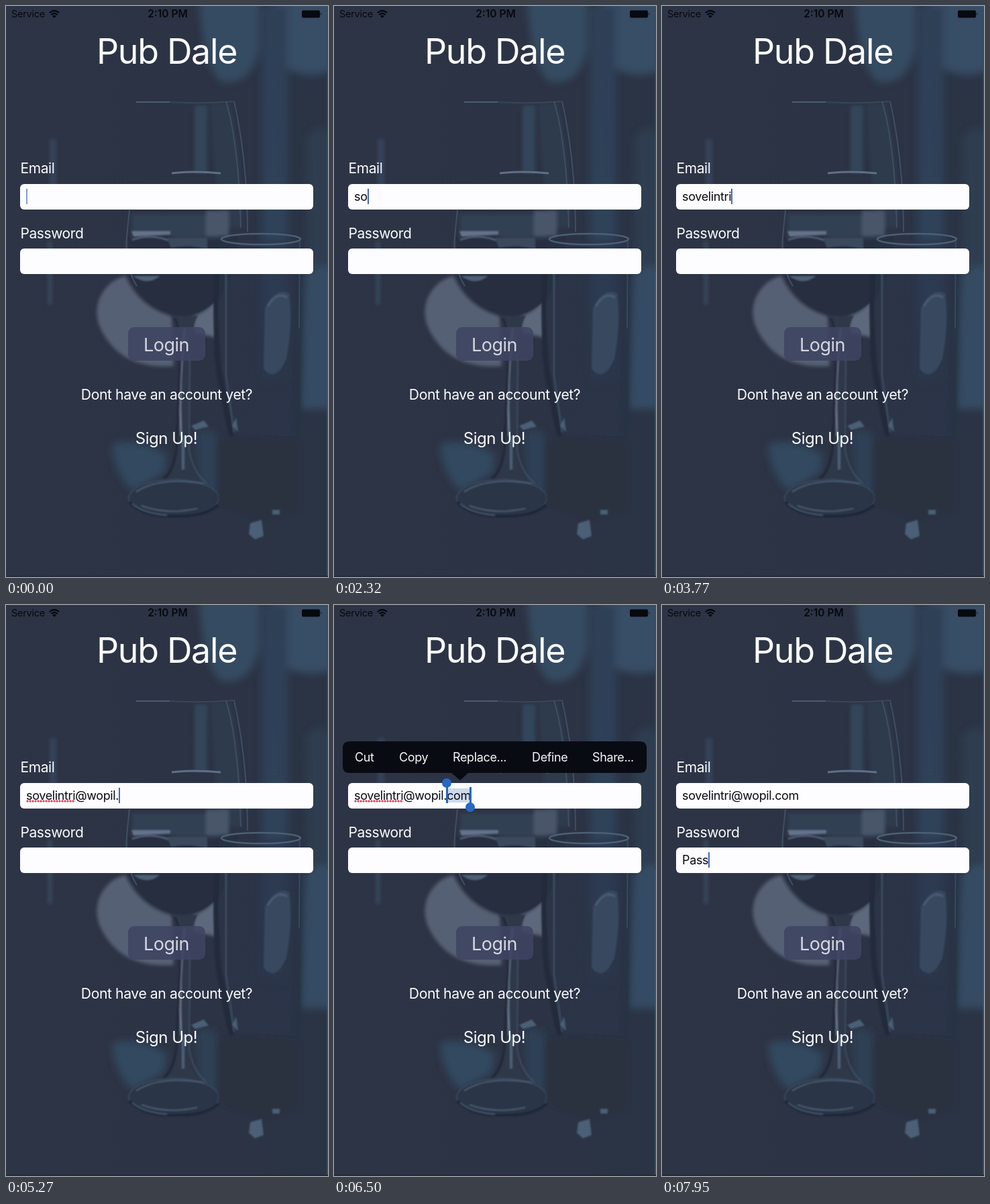
An HTML page that plays this animation: 480x850 px, repeating every 8 s.

```html
<!DOCTYPE html>
<html lang="en">
<head>
<meta charset="utf-8">
<title>Login screen</title>
<style>
html, body { margin: 0; width: 100%; height: 100%; overflow: hidden; background: #2c3345; }
#stage { position: relative; width: 480px; height: 850px; overflow: hidden;
  font-family: Inter, "Open Sans", sans-serif; }
text, .field { letter-spacing: -.02em; }
svg { position: absolute; left: 0; top: 0; }
.mid { text-anchor: middle; }
.title { font-size: 52px; letter-spacing: -.026em; }
.clock { font-size: 15.5px; font-weight: 600; letter-spacing: 0; }
.field { position: absolute; left: 21px; width: 437px; height: 38px; box-sizing: border-box;
  padding-left: 9px; border-radius: 6px; background: #fdfdff; color: #090b12;
  font-size: 18px; line-height: 38px; white-space: pre; }
.caret { position: absolute; top: 7px; width: 2px; height: 23px; background: #4167c5; }
.misspelt { background: radial-gradient(circle, #e0344c 1.3px, transparent 1.8px) 0 100% / 4px 4px repeat-x; }
#tld { position: relative; }
#tld.selected { background: #ccd9eb; }
.handle { display: none; position: absolute; top: -2px; width: 2.5px; height: 24px; background: #2867bd; }
.selected .handle { display: block; }
.handle::after { content: ""; position: absolute; left: -6px; width: 14px; height: 14px;
  border-radius: 50%; background: #2867c4; }
.start { left: -1px; }
.start::after { top: -13px; }
.end { right: -1px; }
.end::after { top: 23px; }
</style>
</head>
<body>
<div id="stage">
  <svg width="480" height="850" viewBox="0 0 480 850">
    <defs>
      <filter id="soft" x="-50%" y="-20%" width="200%" height="140%"><feGaussianBlur stdDeviation="6"/></filter>
      <filter id="haze" x="-100%" y="-20%" width="300%" height="140%"><feGaussianBlur stdDeviation="2.5"/></filter>
      <filter id="fine" x="-30%" y="-30%" width="160%" height="160%"><feGaussianBlur stdDeviation=".8"/></filter>
      <linearGradient id="wall">
        <stop offset="0" stop-color="#2d3445"/><stop offset=".6" stop-color="#2c3344"/>
        <stop offset="1" stop-color="#2a3445"/>
      </linearGradient>
      <linearGradient id="band" x2="0" y2="1">
        <stop offset="0" stop-color="#2f4157"/><stop offset=".7" stop-color="#2d4259"/>
        <stop offset="1" stop-color="#2b3649"/>
      </linearGradient>
    </defs>
    <rect width="480" height="850" fill="url(#wall)"/>

    <g filter="url(#soft)">
      <path d="M288 -20H378V60Q368 116 325 114Q292 100 288 -20Z" fill="#364b62"/>
      <path d="M396 -20H490V95Q445 112 408 86Z" fill="#384e66"/>
      <rect x="382" y="0" width="38" height="560" fill="url(#band)"/>
      <path d="M448 195Q470 170 490 195V400H450Z" fill="#2d3d50"/>
      <path d="M446 400Q470 380 490 390V600H440Z" fill="#354c63"/>
      <path d="M158 652Q195 642 240 668L236 695L190 722Q162 700 158 652Z" fill="#324a60"/>
      <path d="M282 632Q310 625 316 645V735H288Z" fill="#2f4155"/>
    </g>
    <g filter="url(#haze)">
      <rect x="65" y="198" width="10" height="84" fill="#35425a"/>
      <rect x="62" y="350" width="7" height="95" fill="#364459"/>
      <rect x="281" y="148" width="19" height="100" fill="#32445a"/>
      <path d="M304 145H334Q352 220 352 330H318Z" fill="#2d3a4e"/>
      <path d="M178 402Q198 448 247 462L250 536Q190 540 160 508Q125 470 140 434Q152 408 178 402Z" fill="#566175"/>
      <path d="M278 462Q306 452 315 430V494L280 486Z" fill="#5d687b"/>
      <path d="M188 310H318V345H188Z" fill="#313f52"/>
      <path d="M298 305H332V342H298Z" fill="#49566b"/>
      <path d="M438 365V640H424L429 430Z" fill="#283043"/>
    </g>

    <g filter="url(#fine)">
      <path d="M182 347Q225 336 262 347T345 343Q344 405 315 437Q290 461 258 461Q204 451 182 398Z" fill="#272e3f"/>
      <path d="M187 335H245V340L190 343Z" fill="#65728a"/>
      <path d="M188 348Q215 339 240 348T300 349" fill="none" stroke="#596880" stroke-width="2"/>
      <path d="M190 402H229Q211 417 190 402ZM215 365L236 379L210 386Z" fill="#505e75"/>
      <path d="M240 345H300V362Q270 354 246 360Z" fill="#3a485d"/>
      <path d="M317 348H440L434 640H330L317 520Z" fill="#2b384a" opacity=".45"/>
      <path d="M247 461H286Q274 482 274 520L271 650Q272 694 298 714H231Q251 697 254 660L259 520Q259 482 247 461Z" fill="#2e384a"/>
      <path d="M266 480Q257 560 261 640" fill="none" stroke="#66758a" stroke-width="3"/>
      <path d="M264 640V690" fill="none" stroke="#4e5f75" stroke-width="4"/>
      <path d="M252 465Q261 483 260 530L254 660Q251 694 230 709" fill="none" stroke="#212838" stroke-width="3"/>
      <path d="M274 520L273 660Q278 694 300 711" fill="none" stroke="#3f4f64" stroke-width="2"/>
      <ellipse cx="250" cy="733" rx="67" ry="28" fill="#2b3547" stroke="#394a5e" stroke-width="2"/>
      <path d="M184 738Q205 764 270 759Q303 756 316 742" fill="none" stroke="#1f2838" stroke-width="4"/>
      <path d="M194 723Q230 700 295 711M202 744Q240 758 285 748M188 741Q206 756 240 758" fill="none" stroke="#53657b" stroke-width="1.5"/>
      <path d="M316 360Q310 460 317 540L336 640" fill="none" stroke="#232b3b" stroke-width="8"/>
      <path d="M328 365V550L340 635" fill="none" stroke="#405268" stroke-width="2"/>
      <path d="M386 450Q402 418 422 428Q428 470 418 525Q402 562 384 540Z" fill="#37495f"/>
      <path d="M390 447Q404 424 419 434" fill="none" stroke="#4a5d73" stroke-width="3"/>
    </g>
    <path d="M317 650Q350 636 438 650V750L380 766L317 742Z" fill="#293041" filter="url(#haze)"/>
    <g filter="url(#fine)" fill="#4b6076">
      <path d="M364 770L381 765L384 789L371 794L362 786ZM397 750h11v7h-11Z"/>
      <path d="M337 625l6-12 3 21zM276 625l19-8 7 9-20 5z"/>
    </g>
    <g fill="none">
      <path d="M194 143H244" stroke="#4d5c71" stroke-width="2"/>
      <path d="M244 143Q290 146 340 142" stroke="#384659" stroke-width="2"/>
      <path d="M328 142Q347 205 350 330M340 142Q360 230 360 336" stroke="#3f4e63" stroke-width="2"/>
      <path d="M247 249Q280 245 320 249" stroke="#5f7086" stroke-width="3"/>
      <path d="M184 304L180 344Q177 388 195 417" stroke="#414f63" stroke-width="2"/>
      <ellipse cx="380" cy="347" rx="59" ry="8" stroke="#4c5f75" stroke-width="2.5"/>
      <path d="M438 350L437 480" stroke="#364a5f" stroke-width="2"/>
    </g>
    <path d="M479.2 0V400" stroke="#315067" stroke-width="1.5"/>
    <path d="M479.2 395V850" stroke="#286173" stroke-width="1.5"/>
    <path d="M0 849H480" stroke="#252b3b" stroke-width="2"/>

    <g fill="#07090f">
      <text x="8" y="17" font-size="14.5">Service</text>
      <text class="mid clock" x="241" y="17">2:10 PM</text>
      <rect x="441" y="6.5" width="27" height="11" rx="2"/>
      <path d="M469.5 10q2 2 0 4Z"/>
      <path d="M72 18l-2.8-3.1q2.8-2.2 5.6 0Z"/>
      <path d="M64.8 10.2q7.2-6.4 14.4 0M67.4 13.2q4.6-4 9.2 0" fill="none" stroke="#07090f" stroke-width="2.2"/>
    </g>

    <rect x="182" y="478" width="115" height="50" rx="9" fill="#3f4562" opacity=".88"/>
    <g fill="#fbfcff">
      <text class="mid title" x="239.5" y="86">Pub Dale</text>
      <text x="21.5" y="249" font-size="21">Email</text>
      <text x="21.5" y="345.5" font-size="21">Password</text>
      <text class="mid" x="239" y="514" font-size="27" fill="#d6d8e1">Login</text>
      <text class="mid" x="239.5" y="586" font-size="21.2">Dont have an account yet?</text>
      <text class="mid" x="239" y="652" font-size="24">Sign Up!</text>
    </g>
  </svg>

  <div class="field" style="top:265px"><span id="user"></span><span id="host"></span><span id="tld"><span id="ending"></span><i class="handle start"></i><i class="handle end"></i></span><i class="caret" id="emailCaret"></i></div>
  <div class="field" style="top:361px"><span id="password"></span><i class="caret" id="passwordCaret"></i></div>

  <svg id="menu" width="480" height="270" viewBox="0 0 480 270" font-size="18" fill="#f7f8fb">
    <path d="M23 203H456Q466 203 466 213V240Q466 250 456 250H200L188 261L175 250H23Q13 250 13 240V213Q13 203 23 203Z" fill="#090b13"/>
    <text x="31" y="232.5">Cut</text>
    <text x="97" y="232.5">Copy</text>
    <text x="177" y="232.5">Replace...</text>
    <text x="295" y="232.5">Define</text>
    <text x="385" y="232.5">Share...</text>
  </svg>
</div>
<script>
const LOOP = 8000, SELECT_AT = 6100, PASSWORD_AT = 7000;
const $ = id => document.getElementById(id);
const clamp = x => Math.max(0, Math.min(1, x));

// Each run starts typing at a time and adds one letter per step.
const runs = [
  { el: $('user'), text: 'sovelintri', start: 2060, step: 180 },
  { el: $('host'), text: '@wopil.', start: 4150, step: 170 },
  { el: $('ending'), text: 'com', start: 5380, step: 160 },
  { el: $('password'), text: 'Pass', start: 7410, step: 145 }
];

function blink(t) {
  const p = t % 1000 / 1000;
  if (p < .1) return .65 * (1 - p / .1);
  if (p < .9) return clamp((p - .5) / .2);
  return 1 - 3.5 * (p - .9);
}

function draw(t) {
  let lastKey = -1000;
  for (const { el, text, start, step } of runs) {
    const count = Math.max(0, Math.min(text.length, Math.floor((t - start) / step) + 1));
    const typed = text.slice(0, count);
    if (el.textContent !== typed) el.textContent = typed;
    if (count) lastKey = start + (count - 1) * step;
  }
  const inPassword = t >= PASSWORD_AT;
  const selecting = t >= SELECT_AT && !inPassword;
  const caret = t - lastKey < 600 || inPassword ? 1 : blink(t);
  $('emailCaret').style.opacity = selecting || inPassword ? 0 : caret;
  $('passwordCaret').style.opacity = inPassword ? caret : 0;
  $('user').classList.toggle('misspelt', t >= runs[1].start && !inPassword);
  $('tld').classList.toggle('selected', selecting);
  $('menu').style.opacity = clamp((t - SELECT_AT - 60) / 120) * clamp((PASSWORD_AT + 120 - t) / 120);
}

function tick() {
  draw(performance.now() % LOOP);
  requestAnimationFrame(tick);
}
tick();
</script>
</body>
</html>
```
